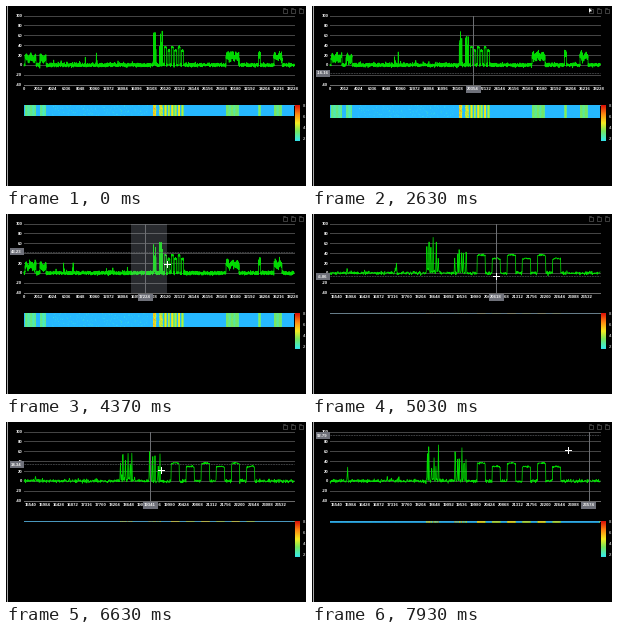
A matplotlib script for the animation above (8 s loop, 300 px wide and 180 px high).

```python
import numpy as np
import matplotlib.pyplot as plt
from matplotlib.animation import FuncAnimation
from matplotlib.colors import LinearSegmentedColormap
from matplotlib.patches import Polygon, Rectangle

W, H, DPI = 300, 180, 100
LOOP, STEP = 8000, 40
LEFT, RIGHT, TOP, BOTTOM = 18, 288, 9.5, 78.8
ZERO, SCALE = 59, .495
FULL, ZOOM = (0, 38430), (15316, 23940)
DRAG_AT, ZOOM_AT, LAG = 3970, 5030, 300
TICKS, COLS = 44, RIGHT - LEFT
PT = 72 / DPI

plt.rcParams.update({"font.family": "Liberation Sans", "font.weight": "bold"})
heat_map = LinearSegmentedColormap.from_list("heat", [
    (0, "#26b8ff"), (.15, "#3cecdc"), (.36, "#78e65a"),
    (.56, "#f4ec20"), (.78, "#ff8a10"), (1, "#dc1408")])


def to_x(v, view):
    return LEFT + (v - view[0]) * COLS / (view[1] - view[0])


def to_v(x, view):
    return view[0] + (x - LEFT) * (view[1] - view[0]) / COLS


def to_y(a):
    return ZERO - a * SCALE


# Synthetic spectrum: noise, busy bands, bursts and square pulses
V = np.arange(0, 38431, 10)
XF, XZ = to_x(V, FULL), to_x(V, ZOOM)
BANDS = [(19, 11, 14), (34, 6, 13), (220, 13, 17), (252.5, 2, 20), (268, 8, 17)]


def add_spike(a, x, at, height, width):
    a += height * np.clip(1 - np.abs(x - at) / width, 0, None)


def sweep(k):
    rng = np.random.default_rng(40 + k)
    a = rng.normal(0, 1.7, V.size)
    for start, width, level in BANDS:
        m = (XF >= start) & (XF < start + width)
        wave = 3 * np.sin(1.3 * (XF[m] - start))
        a[m] += level + wave + rng.normal(0, 3.5, m.sum())
    for start in (115, 143):
        for n in range(6):
            at = start + 2.2 * n + rng.uniform(-.6, .6)
            add_spike(a, XZ, at, 74 * rng.uniform(.4, 1), .6)
    m = (XZ > 114) & (XZ < 129)
    a[m] += 14 * np.exp((114 - XZ[m]) / 9) * rng.random(m.sum())
    for n in range(6):
        d = XZ - 165 - 15.1 * n
        m = (d >= 0) & (d < 8.3)
        a[m] = (35, 28)[n % 2] + 1.5 * np.sin(np.pi * d[m] / 8.3) + rng.normal(0, 1, m.sum())
    for height in np.append(rng.uniform(3, 10, 14), rng.uniform(14, 30, 2)):
        add_spike(a, XF, rng.uniform(45, 142), height, .15)
    return a


def heat_row(a, view):
    edges = np.linspace(*view, COLS + 1)
    i = np.minimum(np.searchsorted(V, edges[:-1]), V.size - 1)
    peak = np.maximum.reduceat(a, i)
    mean = np.array([c.mean() for c in np.split(a, i[1:])])
    return heat_map(np.clip(((peak + mean) / 2 - 2) / 60, 0, 1))[:, :3]


SWEEPS = [sweep(k) for k in range(TICKS)]
FULL_ROWS = np.array([heat_row(a, FULL) for a in SWEEPS])
ZOOM_ROWS = np.array([heat_row(a, ZOOM) for a in SWEEPS[10:16]])

# Pointer path: time, x, y
PATH = np.array([
    (150, 185, 160), (300, 188, 139), (1880, 188, 139), (2330, 161, 67),
    (2600, 278, 4), (3150, 278, 4), (3530, 141, 40), (3900, 125, 30),
    (4700, 184, 62), (5840, 184, 62), (6330, 144, 42), (6630, 155, 48),
    (7630, 278, 12), (7930, 256, 28)]).T


def pointer(t):
    return np.interp(t, PATH[0], PATH[1]), np.interp(t, PATH[0], PATH[2])


fig = plt.figure(figsize=(W / DPI, H / DPI), dpi=DPI, facecolor="black")
ax = fig.add_axes([0, 0, 1, 1])


def line(xs, ys, color, width=1, z=1, **kw):
    return ax.plot(xs, ys, color=color, lw=width * PT, zorder=z, **kw)[0]


def label(x, y, s="", ha="center", z=3, color="#f0f0f0"):
    return ax.text(x, y, s, ha=ha, va="center_baseline", color=color,
                   fontsize=4.3 * PT, zorder=z)


def box(x, y, w, h, z=1, **kw):
    return ax.add_patch(Rectangle((x, y), w, h, zorder=z, **kw))


def icons():
    grey = "#626262"
    for x in (277, 285, 293):
        box(x, 3, 4, 4, ec=grey, fc="none", lw=.6 * PT)
        line([x - .5, x + 1.5], [2, 2], grey, .6)


heat = ax.imshow(FULL_ROWS[:28], extent=(LEFT, RIGHT, 110, 99), aspect="auto", zorder=1)
ramp = heat_map(np.linspace(1, .12, 36))[:, None, :3]
ax.imshow(ramp, extent=(289, 294, 135, 99), aspect="auto", zorder=1)
for n in range(4):
    label(296.5, 99.5 + 11 * n, str(8 - 2 * n), "left", color="#b0b0b0")

for a in range(-40, 101, 20):
    line([LEFT, RIGHT], [to_y(a)] * 2, "#6a6a6a" if a == -40 else "#444444")
    label(16.3, to_y(a), str(a), "right")
line([LEFT, RIGHT], [98.5, 98.5], "#707478", z=.5)
line([.5, .5, W - .5, W - .5], [0, H - .5, H - .5, 0], "#a8a8a8")
icons()

trace = line([], [], "#00f000", .75, 4, alpha=.9)
ticks = [label(0, 82.9) for _ in range(20)]
select = box(125, TOP, 0, BOTTOM - TOP, 5, fc="#d2dbee", alpha=.2, lw=0)

v_line = line([], [], "#6c6e72", 1, 6)
h_line = line([], [], "#55575a", .7, 6, dashes=(2.5, 1.2))
x_box = box(0, 79.5, 15, 7, 7, fc="#6e7079", lw=0)
y_box = box(3.5, 0, 14, 7, 7, fc="#6e7079", lw=0)
x_text, y_text = label(0, 82.9, z=8), label(10.5, 0, z=8)
crosshair = [v_line, h_line, x_box, y_box, x_text, y_text]

ARROW = np.array([(0, 0), (0, 4.6), (1.3, 3.4), (3.2, 3.2)])
arrow = ax.add_patch(Polygon(ARROW, fc="white", lw=0, zorder=9))
plus = [line([], [], "white", 1, 9) for _ in range(2)]

ax.set_xlim(0, W)
ax.set_ylim(H, 0)
ax.axis("off")


def draw_chart(t, zoomed):
    view, step, first = (ZOOM, 444, 15540) if zoomed else (FULL, 2012, 0)
    k = 10 + (t - ZOOM_AT) // 530 if zoomed else min((t + 360) // 520, 9)
    x = to_x(V, view)
    m = (x >= LEFT) & (x <= RIGHT)
    trace.set_data(x[m], to_y(SWEEPS[k][m]))
    for n, tick in enumerate(ticks):
        v = first + n * step
        tick.set_text(str(v) if v < view[1] else "")
        tick.set_x(to_x(v, view))


def draw_heat(t, zoomed):
    if zoomed:
        n = min(1 + (t - ZOOM_AT) // 530, 6)
        heat.set_data(ZOOM_ROWS[:n].mean(axis=0, keepdims=True))
        heat.set_extent((LEFT, RIGHT, 100 + n // 5, 99))
        heat.set_alpha(.13 * n)
    else:
        n = 28 + (t + 10) // 510
        heat.set_data(FULL_ROWS[:n][::-1])
        heat.set_extent((LEFT, RIGHT, 99 + .38 * n, 99))
        heat.set_alpha(1)


def draw_crosshair(t, view):
    x, y = pointer(t - LAG)
    shown = TOP < y < BOTTOM and not 2720 <= t < 3600
    for part in crosshair:
        part.set_visible(shown)
    v_line.set_data([x, x], [TOP, BOTTOM])
    h_line.set_data([LEFT, RIGHT], [y, y])
    x_box.set_x(x - 7.5)
    y_box.set_y(y - 3.5)
    x_text.set_x(x)
    x_text.set_text(f"{to_v(x, view):.0f}")
    y_text.set_y(y)
    y_text.set_text(f"{(ZERO - y) / SCALE:.2f}")


def draw_pointer(t):
    x, y = pointer(t)
    cross = t > 3150 and y > TOP
    arrow.set_visible(t >= 150 and not cross)
    arrow.set_xy(ARROW + (x - 1, y - 2))
    for part, dx, dy in zip(plus, (3, 0), (0, 3)):
        part.set_visible(cross)
        part.set_data([x - dx, x + dx], [y - dy, y + dy])
    select.set_visible(DRAG_AT <= t < ZOOM_AT)
    select.set_width(x - 125)


def update(i):
    t = i * STEP + STEP - 10
    zoomed = t >= ZOOM_AT
    draw_chart(t, zoomed)
    draw_heat(t, zoomed)
    draw_crosshair(t, ZOOM if zoomed else FULL)
    draw_pointer(t)
    return []


anim = FuncAnimation(fig, update, frames=LOOP // STEP, interval=STEP,
                     init_func=lambda: [], repeat=True, repeat_delay=0)
plt.show()
```
